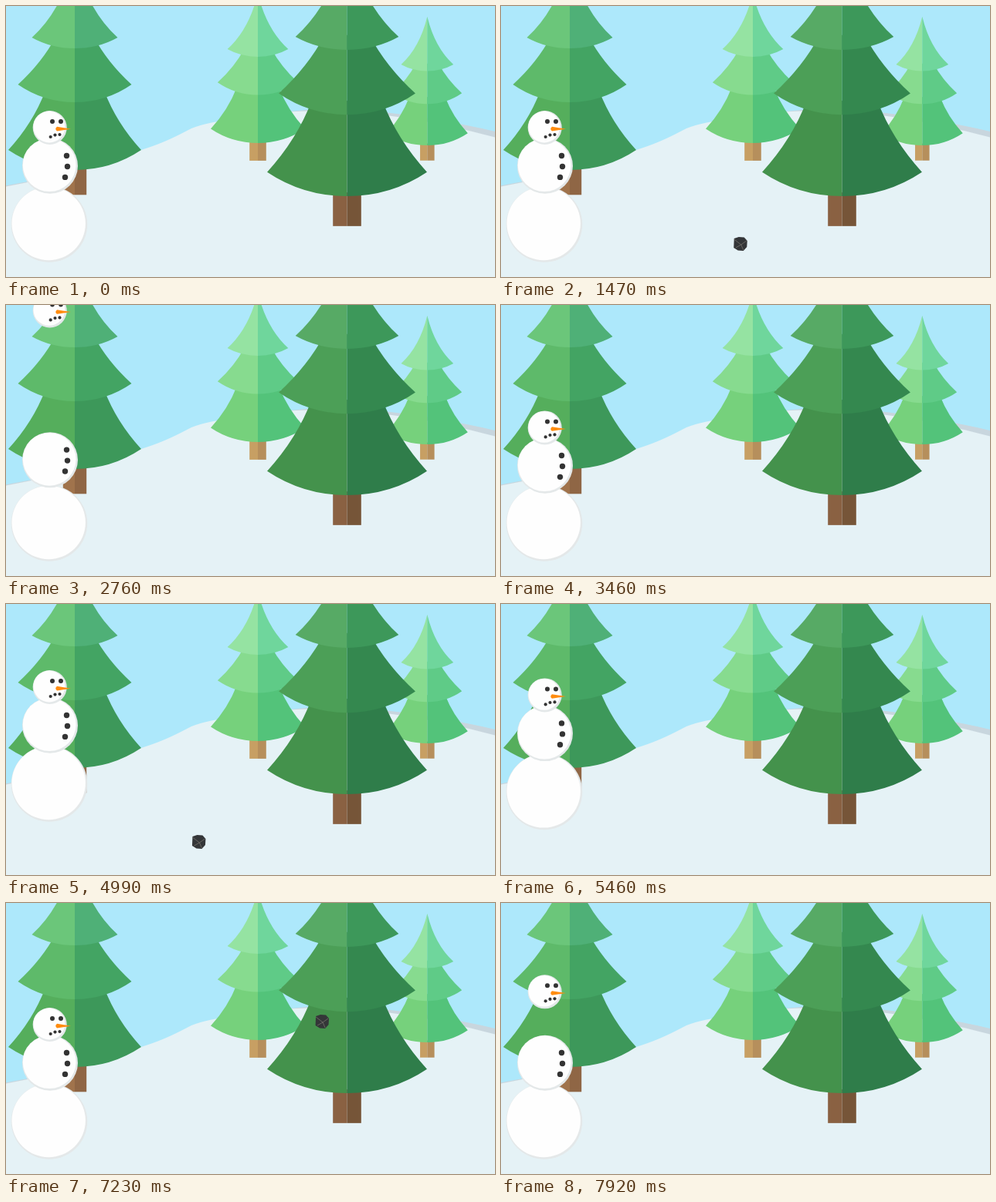
Write an HTML page with a canvas that moves like this. It is 633x352 px and loops after 8 s.

```html
<!DOCTYPE html>
<html lang="en">
<head>
<meta charset="utf-8">
<title>Jumping snowman</title>
<style>
html, body { margin: 0; width: 100%; height: 100%; overflow: hidden; }
canvas { display: block; width: 633px; height: 352px; }
</style>
</head>
<body>
<canvas id="stage" width="633" height="352"></canvas>
<script>
const ctx = document.getElementById('stage').getContext('2d');
const LOOP = 8000, STEP = 1000 / 13;
const GRAVITY = 3.16e-4, ROCK_SPEED = 0.94;

function fillPath(color, draw) {
  ctx.fillStyle = color;
  ctx.beginPath();
  draw();
  ctx.fill();
}
const poly = (color, pts) => fillPath(color, () => {
  pts.forEach(([x, y]) => ctx.lineTo(x, y));
});
const dot = (color, x, y, r) => fillPath(color, () => ctx.arc(x, y, r, 0, 7));

// ---- scenery ----
function drawHills() {
  ctx.fillStyle = '#ade8fb';
  ctx.fillRect(0, 0, 633, 352);
  fillPath('#c8d6de', () => {
    ctx.moveTo(0, 233.3);
    ctx.lineTo(60, 222);
    ctx.lineTo(340, 142);
    ctx.bezierCurveTo(400, 128, 500, 132, 633, 163);
    ctx.lineTo(633, 352);
    ctx.lineTo(0, 352);
  });
  fillPath('#e5f2f6', () => {
    ctx.moveTo(0, 234.5);
    ctx.bezierCurveTo(70, 222, 125, 204, 175, 187);
    ctx.bezierCurveTo(205, 178, 222, 168, 240, 159);
    ctx.bezierCurveTo(255, 153, 268, 151, 285, 148);
    ctx.bezierCurveTo(400, 126, 500, 136, 633, 170.5);
    ctx.lineTo(633, 352);
    ctx.lineTo(0, 352);
  });
}

// Tier: start half-width and height, control point, corner, bottom (height above the base line).
const TIERS = [
  [38, 103, 54, 61, 86, 26, 0],
  [24, 174, 42, 140, 73.5, 111, 88],
  [0, 274, 16, 208, 55.5, 172, 158]
];

function drawTree(x, base, scale, trunk, left, right) {
  [-1, 1].forEach((side, i) => {
    const X = u => x + side * u * scale;
    const Y = v => base - v * scale;
    ctx.fillStyle = trunk[i];
    ctx.fillRect(X(0), Y(4), side * 15.2 * scale, 36.3 * scale);
    const colors = i ? right : left;
    TIERS.forEach(([a, top, cx, cy, w, corner, low], n) => {
      fillPath(colors[n], () => {
        ctx.moveTo(X(0), Y(top));
        ctx.lineTo(X(a), Y(top));
        ctx.quadraticCurveTo(X(cx), Y(cy), X(w), Y(corner));
        ctx.quadraticCurveTo(X(w * 0.55), Y(low), X(0), Y(low));
      });
    });
  });
}

const PALE = [['#76d17c', '#87db8f', '#95e3a2'], ['#53c37a', '#5fcb87', '#6fd69c']];

function drawScenery() {
  drawHills();
  drawTree(89, 213, 1, ['#a0734c', '#8f6645'],
    ['#55ae5c', '#5eba6a', '#6bc67a'], ['#3d985a', '#43a463', '#4fb077']);
  drawTree(326, 178, 0.709, ['#c79f63', '#b68f5c'], ...PALE);
  drawTree(545.3, 181, 0.61, ['#c79f63', '#b68f5c'], ...PALE);
  drawTree(441.5, 247, 1.203, ['#8a6142', '#765538'],
    ['#44924c', '#4c9f57', '#57aa65'], ['#2f7d4a', '#34884f', '#3d985a']);
}

// ---- snowman ----
const HOPS = [[1465, 0.28], [4752, 0.28]];
const DOUBLE = [1797, 0.254];
const byTime = list => list.sort((a, b) => a[0] - b[0]);
const JUMPS = {
  base: HOPS,
  torso: byTime([...HOPS, DOUBLE]),
  head: byTime([...HOPS, DOUBLE, [2193, 0.254], [7358, 0.254]])
};

// Height above rest, and time since the last landing (negative in the air).
function flight(jumps, t) {
  const past = jumps.filter(j => j[0] < t);
  if (!past.length) return { up: 0, rest: LOOP };
  const [t0, v] = past[past.length - 1];
  const h0 = flight(jumps, t0).up;
  const d = t - t0;
  const air = (v + Math.sqrt(v * v + 4 * GRAVITY * h0)) / (2 * GRAVITY);
  return { up: Math.max(0, h0 + v * d - GRAVITY * d * d), rest: d - air };
}

function dip({ rest }, size) {
  const s = rest / 110;
  return s > 0 ? size * s * Math.exp(1 - s) : 0;
}

function ball(x, y, r) {
  dot('#e4e8e9', x, y, r);
  dot('#fefefe', x - 0.8, y - 1, r - 1.6);
}

function drawSnowman(t) {
  const base = flight(JUMPS.base, t);
  const torso = flight(JUMPS.torso, t);
  const head = flight(JUMPS.head, t);
  const sink = torso.up ? 0 : Math.max(dip(torso, 1), dip(head, 1));

  ball(56, 283.5 - base.up, 49.3);

  const ty = sink - torso.up;
  ball(57, 207.7 + ty, 36);
  [[78.5, 194.5], [79.5, 208.5], [76.5, 222.4]]
    .forEach(([x, y]) => dot('#333', x, y + ty, 3.7));

  const hy = dip(head, 1.5) - head.up;
  ball(56.7, 158 + hy, 22);
  [[60, 150, 3], [71, 150, 3], [57.7, 170, 2.1], [63.5, 167.6, 2.1], [69.5, 167, 2.1]]
    .forEach(([x, y, r]) => dot('#333', x, y + hy, r));
  fillPath('#ff8c0f', () => {
    ctx.moveTo(66, 156.8 + hy);
    ctx.lineTo(84, 159.7 + hy);
    ctx.lineTo(66, 162.4 + hy);
    ctx.quadraticCurveTo(62.5, 159.6 + hy, 66, 156.8 + hy);
  });
}

// ---- hazards: warning start, launch, first x, y ----
const HAZARDS = [
  [225, 1150, 599, 309],
  [3610, 4610, 611, 309],
  [5995, 6995, 626, 154]
];

function drawWarning(y) {
  ctx.save();
  ctx.translate(586.7, y);
  ctx.lineJoin = 'round';
  ctx.strokeStyle = '#ff0505';
  ctx.lineWidth = 5;
  fillPath('#ff0505', () => {
    ctx.moveTo(0, -9.5);
    ctx.lineTo(12, 10.5);
    ctx.lineTo(-12, 10.5);
    ctx.closePath();
  });
  ctx.stroke();
  poly('#ff8f8f', [[-1.5, -5], [1.5, -5], [0.9, 4], [-0.9, 4]]);
  dot('#ff8f8f', 0, 7, 1.5);
  ctx.restore();
}

function drawRock(x, y) {
  ctx.save();
  ctx.translate(x, y);
  poly('#343638', [[-8, -7], [-2, -9], [5, -8.5], [9, -4], [8.5, 4], [4, 9], [-3, 8.5], [-8.5, 5]]);
  ctx.strokeStyle = '#77736d';
  ctx.lineWidth = 0.8;
  ctx.beginPath();
  ctx.moveTo(-8, -6);
  ctx.lineTo(1, 1);
  ctx.lineTo(8, -4);
  ctx.moveTo(1, 1);
  ctx.lineTo(-6, 5);
  ctx.moveTo(1, 1);
  ctx.lineTo(4, 8);
  ctx.stroke();
  ctx.restore();
}

function drawHazards(t) {
  for (const [warn, launch, x, y] of HAZARDS) {
    if (t >= warn && t < launch) drawWarning(y + 0.5);
    const start = Math.ceil(launch / STEP) * STEP;
    const pos = x - ROCK_SPEED * (t - start);
    if (t >= launch && pos > -12) drawRock(pos, y);
  }
}

// Picture advances at 13 steps per second.
const began = performance.now();
function frame(now) {
  const ms = Math.max(0, now - began) % LOOP;
  const t = Math.floor((ms + 14) / STEP) * STEP % LOOP;
  drawScenery();
  drawSnowman(t);
  drawHazards(t);
  requestAnimationFrame(frame);
}
frame(began);
</script>
</body>
</html>
```
